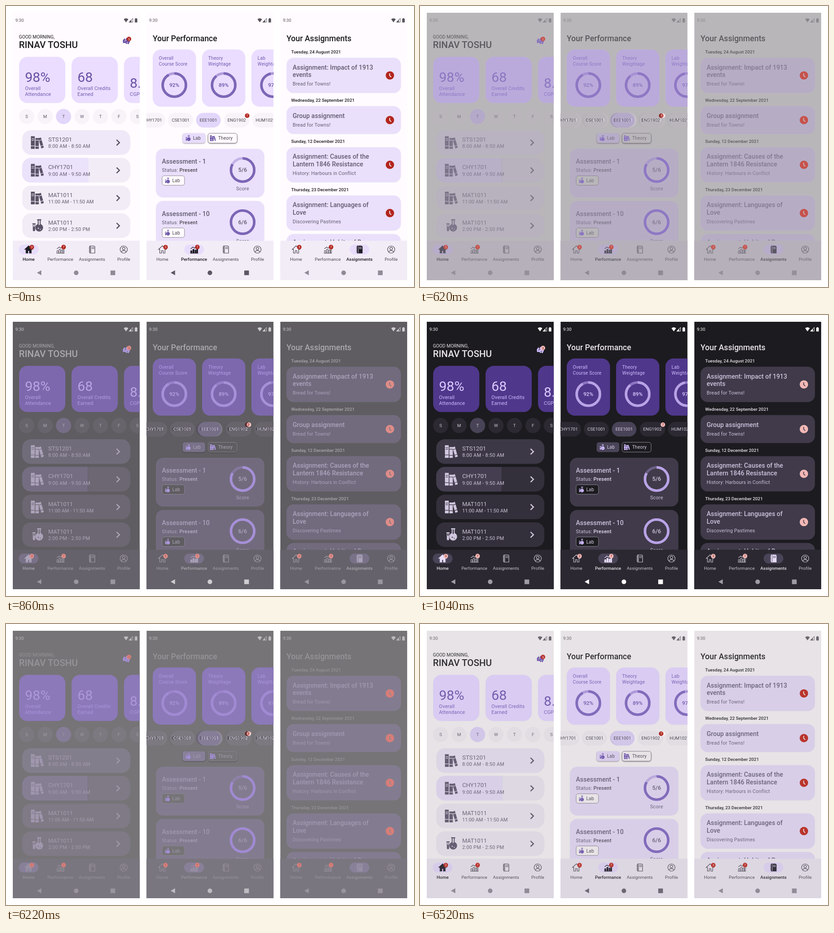
Write an HTML page that moves like this. It is 901 by 622 pixels and loops after 6580 ms.

```html
<!DOCTYPE html>
<html lang="en">
<head>
<meta charset="utf-8">
<title>Light and dark themes</title>
<style>
html, body { margin: 0; width: 100%; height: 100%; overflow: hidden; background: #fff; }
#stage { display: block; width: 901px; height: 622px; }
text { font-family: Roboto, "Open Sans", sans-serif; white-space: pre; }
</style>
</head>
<body>
<svg id="stage" viewBox="0 0 901 622">
  <g id="light"></g>
  <g id="dark"></g>
</svg>
<script>
const LIGHT = {
  dark: false, bg: '#fffbfe', ink: '#1c1b1f', status: '#58545d', nav: '#f2ecf7', navInk: '#49454f',
  pill: '#e8dcfc', card: '#eaddff', cardInk: '#6750a4', cardSub: '#7059ae',
  ring: '#7c66b6', ringRest: '#b39ddb', scoreRest: '#c4b3e6',
  day: '#f7f3f8', dayOn: '#e3d6fb', dayInk: '#625b6c',
  row: '#f1ecf6', rowDone: '#efe8f8', rowPart: '#ebe2fb', rowInk: '#645d70', icon: '#5a5266', chevron: '#544e5e',
  panel: '#eae0fb', panelInk: '#625b71', strong: '#49454f',
  chip: '#fffbfe', chipInk: '#49454f', line: '#8a8490', lab: '#6750a4',
  alert: '#b3261e', alertInk: '#fff', key: '#8f8a95', keyOn: '#5d5765'
};
const DARK = {
  dark: true, bg: '#1c1b1f', ink: '#e9e4ea', status: '#fff', nav: '#2b2831', navInk: '#cac4d0',
  pill: '#4a4458', card: '#4f378b', cardInk: '#dccbff', cardSub: '#d0bcff',
  ring: '#b9a3e6', ringRest: '#8d75c2', scoreRest: '#6b6083',
  day: '#2c2932', dayOn: '#494357', dayInk: '#cac4d0',
  row: '#34303b', rowDone: '#3d3846', rowPart: '#443e50', rowInk: '#ccc4d8', icon: '#d0c6de', chevron: '#d3cbdf',
  panel: '#403a4a', panelInk: '#ccc2dc', strong: '#e8def8',
  chip: '#1c1b1f', chipInk: '#d9d0e4', line: '#8f8a96', lab: '#d0bcff',
  alert: '#f2b8b5', alertInk: '#601410', key: '#a09ca5', keyOn: '#fff'
};
const PITCH = 295.3;

const text = (x, y, size, fill, str, { w = 400, ls = 0, mid = false } = {}) =>
  `<text x="${x}" y="${y}" font-size="${size}" font-weight="${w}" fill="${fill}" letter-spacing="${ls}"` +
  `${mid ? ' text-anchor="middle"' : ''}>${str}</text>`;
const box = (x, y, w, h, r, fill, more = '') =>
  `<rect x="${x}" y="${y}" width="${w}" height="${h}" rx="${r}" fill="${fill}" ${more}/>`;
const dot = (x, y, r, fill) => `<circle cx="${x}" cy="${y}" r="${r}" fill="${fill}"/>`;
const path = (d, fill, stroke = 'none', width = 1) =>
  `<path d="${d}" fill="${fill}" stroke="${stroke}" stroke-width="${width}"/>`;
const at = (x, y, body, scale = 1) => `<g transform="translate(${x} ${y}) scale(${scale})">${body}</g>`;

const badge = (c, x, y, n) =>
  dot(x, y, 5, c.alert) + text(x, y + 2.5, 7, c.alertInk, n, { mid: true });

const ring = (c, x, y, part, rest, label, size) =>
  `<g fill="none" stroke-width="5.6"><circle cx="${x}" cy="${y}" r="25.7" stroke="${rest}"/>` +
  `<circle cx="${x}" cy="${y}" r="25.7" stroke="${c.ring}" pathLength="100" stroke-dasharray="${part} 100"` +
  ` transform="rotate(-90 ${x} ${y})"/></g>` + label(x, y, size);

const books = (fill, gap) =>
  path('M0 0h8.5v28H0zM10 4h7.5v24H10zM16.5 4.5l5.5-1.8L28.5 25 23 27z', fill) +
  path('M1.5 5.5H7M1.5 9H7M0 21.5h8.5M10 9h7.5M10 22.5h7.5M17.5 10l6-2M21.5 22l6-2', 'none', gap, 1.2);
const flask = (fill, gap) =>
  path('M0 9h7v2h-1v13a2.5 2.5 0 0 1-5 0V11H0z', fill) +
  path('M10.5 0h9v2.4h-1.2v8.2a8.6 8.6 0 1 1-6.6 0V2.4h-1.2z', fill) +
  path('M13.8 2.4h2.4v10h-2.4zM2.4 11.5h2.2v5H2.4z', gap) + dot(13, 20, 1.3, gap) + dot(17.5, 22.5, 1, gap);

const clock = (c, y) =>
  dot(847.8, y, 9.3, c.alert) +
  path(`M847.3 ${y - 4.8}v5.3l3.4 3.2`, 'none', c.dark ? '#403a4a' : '#fff', 1.7);

const statusBar = c =>
  text(20.8, 35.3, 9.6, c.status, '9:30') +
  path('M260 29.2q5-3.8 10.2 0L265.1 36.3z', c.status) +
  path('M271.8 35.8h8.2v-8.4z', 'none', c.status, 1) + path('M271 36.2l6-6v6z', c.status) +
  box(284.4, 28, 5.6, 8.4, 1, c.status) + box(286, 27, 2.4, 2, 0, c.status);

const navIcons = [
  (ink, on, gap) =>
    path('M-8.5-.3L0-8.2 8.5-.3H5.8V8H1.8V2.5H-1.8V8H-5.8V-.3z', on ? ink : 'none', ink, 1.2),
  (ink, on) =>
    path('M-7.5 8V2.5h3V8M-2.8 8V-.5h3V8M1.9 8V1h3V8M6 8V-1.5h2.2V8', on ? ink : 'none', ink, 1) +
    path('M-8.5 8.2H9M-7.5-1.5l5-4 3.5 2.5 5-4.2', 'none', ink, 1.1),
  (ink, on, gap) =>
    path('M-4.8-8H4.2l2 1.6V8H-4.8z', on ? ink : 'none', ink, 1.2) +
    path('M-7-5.2h3.4M-7-1.8h3.4M-7 1.7h3.4M-7 5.1h3.4', 'none', ink, 1.3) +
    path('M-2.6-7.5V7.5M0-5h4v3.2H0z', 'none', on ? gap : ink, .9),
  ink =>
    `<circle r="8" fill="none" stroke="${ink}" stroke-width="1.2"/>` +
    `<circle cy="-2.2" r="3" fill="none" stroke="${ink}" stroke-width="1.2"/>` +
    path('M-5.3 5.6C-4 1.2 4 1.2 5.3 5.6', 'none', ink, 1.2)
];
const navNames = ['Home', 'Performance', 'Assignments', 'Profile'];

function navBar(c, active) {
  const key = active === 1 ? c.keyOn : c.key;
  const items = navNames.map((name, i) => {
    const x = 50 + 70 * i, on = i === active;
    const ink = on ? (c.dark ? '#e8def8' : '#1d1b24') : c.navInk;
    return (on ? box(x - 21.8, 528, 43.6, 22, 11, c.pill) : '') +
      at(x, 539, navIcons[i](ink, on, c.pill)) +
      text(x, 563.6, 9.8, on ? c.ink : c.navInk, name, { mid: true, ls: .05, w: on ? 500 : 400 });
  });
  return box(14, 519.5, 283, 88, 0, c.nav) + items.join('') +
    badge(c, 57, 533.8, 3) + badge(c, 127.2, 533.6, 7) +
    path('M68.3 590.5l9.7-5.6v11.2z', key) + dot(155, 590.6, 5.1, key) + box(230.8, 585.4, 10.4, 10.4, .5, key);
}

function screen(c, i, body) {
  const x = 15 + PITCH * i;
  return `<svg x="${x}" y="15" width="280.3" height="592" viewBox="${x} 15 280.3 592">` +
    box(x, 15, 281, 592, 0, c.bg) + body + at(PITCH * i, 0, statusBar(c) + navBar(c, i)) + '</svg>';
}

function home(c) {
  let s = text(28.6, 72, 10.2, c.ink, 'GOOD MORNING,') +
    text(28.6, 93.4, 20.4, c.ink, 'RINAV TOSHU', { w: 500 }) +
    path('M258 76l4-5 1.5 5 2-5.5 6.5 4 1.5 4.5-3 6-2.5-2.5-2 2-2.5-3-5 .5z', c.lab) +
    path('M261 78l5-2M266 81l4-1', 'none', c.bg, 1) + badge(c, 271.5, 73, 3);
  const card = (x, num, y, lines) =>
    box(x, 112.6, 102, 102.2, 18, c.card) + text(x + 13, y, 30, c.cardInk, num) +
    lines.map((t, i) => text(x + 13, 198.6 - 13 * (lines.length - 1 - i), 11, c.cardSub, t, { ls: .15 })).join('');
  s += card(29, '98%', 167.8, ['Overall', 'Attendance']) +
    card(144.8, '68', 167.8, ['Overall Credits', 'Earned']) + card(260.6, '8.7', 181.4, ['CGPA']);

  [...'SMTWTFS'].forEach((d, i) => {
    const x = 45.6 + 40.75 * i;
    s += dot(x, 244.6, 16.8, i === 2 ? c.dayOn : c.day) + text(x, 248, 9.8, c.dayInk, d, { mid: true });
  });

  [['STS1201', '8:00 AM - 8:50 AM'], ['CHY1701', '9:00 AM - 9:50 AM'],
   ['MAT1011', '11:00 AM - 11:50 AM'], ['MAT1011', '2:00 PM - 2:50 PM']].forEach(([code, time], i) => {
    const y = 275 + 61.35 * i, fill = i ? c.row : c.rowDone;
    s += box(35.8, y, 238.8, 54.4, 19, fill);
    if (i === 1) {
      const end = c.dark ? 180 : 182;
      s += path(`M${end} ${y}H54.8a19 19 0 0 0-19 19v16.4a19 19 0 0 0 19 19H${end}z`, c.rowPart);
    }
    const back = i === 1 ? c.rowPart : fill;
    s += i === 3 ? at(58.3, y + 13, flask(c.icon, back)) : at(55, y + 13.2, books(c.icon, back));
    s += text(93.2, y + 25, i > 1 ? 12.6 : 13.1, c.rowInk, code) +
      text(93.2, y + 39.2, 10.8, c.rowInk, time, { ls: i === 2 ? 0 : .28 }) +
      path(`M244.2 ${y + 21.2}l6.3 6.2-6.3 6.2`, 'none', c.chevron, 2.4);
  });
  return s;
}

function performanceTab(c) {
  let s = text(324, 77.8, 17.5, c.ink, 'Your Performance', { w: 500 });
  const percent = (x, y, n) => text(x, y + 4, 11.8, c.cardInk, n + '%', { w: 500, mid: true });
  [['Overall', 'Course Score', 92], ['Theory', 'Weightage', 89], ['Lab', 'Weightage', 97]].forEach(([a, b, n], i) => {
    const x = 324 + 109 * i;
    s += box(x, 96.2, 95.6, 126.6, 18, c.card) +
      text(x + 13.6, 119.4, 10.2, c.cardSub, a, { ls: .2 }) + text(x + 13.6, 131.6, 10.2, c.cardSub, b, { ls: .2 }) +
      ring(c, x + 47.7, 175, n, c.ringRest, percent, n);
  });

  const dx = c.dark ? 3.8 : 0;
  [['CHY1701', 324.2, 55], ['CSE1001', 385.6, 55], ['EEE1001', 447, 54.4],
   ['ENG1902', 509.4, 56], ['HUM1021', 573, 58]].forEach(([code, x, w], i) => {
    s += box(x + dx - w / 2, 236.4, w, 32.6, 16.3, i === 2 ? c.dayOn : c.day) +
      text(x + dx, 256, 9.7, c.chipInk, code, { mid: true });
  });
  s += badge(c, 532.6 + dx, 242.8, 7);

  const soft = c.dark ? '' : 'style="filter:drop-shadow(0 1px 1.2px #0006)"';
  const labIcon = (x, y, gap) => at(x, y, flask(c.lab, gap), .46);
  s += box(390, 281.8, 50, 21.6, 5, c.pill, soft) + labIcon(396.8, 286.2, c.pill) +
    text(413, 296.3, 10.2, c.chipInk, 'Lab', { ls: .1 }) +
    box(446.2, 281.8, 64.2, 21.6, 5, c.chip, `stroke="${c.line}" ${soft}`) +
    at(450.5, 286.2, books(c.lab, c.chip), .46) + text(468.4, 296.3, 10.2, c.chipInk, 'Theory', { ls: .15 });

  const score = (x, y, n) => text(x, y + 4.4, 12.8, c.panelInk, n + '/6', { w: 500, mid: true });
  [['1', 5], ['10', 6]].forEach(([id, n], i) => {
    s += at(0, 115.5 * i,
      box(331, 316, 239.6, 108, 16, c.panel) +
      text(344.3, 349.4, 14, c.panelInk, 'Assessment - ' + id, { w: 500 }) +
      text(344.3, 367, 11.1, c.panelInk,
        `Status: <tspan font-weight="500" fill="${c.strong}">Present</tspan>`, { ls: .2 }) +
      box(344.8, 375.8, 49.4, 21, 4.5, c.chip, `stroke="${c.line}"`) + labIcon(351, 380, c.chip) +
      text(367.2, 390, 10.2, c.chipInk, 'Lab', { ls: .1 }) +
      ring(c, 522.5, 363, n / 6 * 100, c.scoreRest, score, n) +
      text(522.5, 408, 10.9, c.panelInk, 'Score', { mid: true, ls: .2 }));
  });
  return s;
}

function assignments(c) {
  let s = text(619.4, 77.8, 17.5, c.ink, 'Your Assignments', { w: 500 });
  [['Tuesday, 24 August 2021', 105, ['Assignment: Impact of 1913', 'events'], 'Bread for Towns!'],
   ['Wednesday, 22 September 2021', 212, ['Group assignment'], 'Bread for Towns!'],
   ['Sunday, 12 December 2021', 302.8, ['Assignment: Causes of the', 'Lantern 1846 Resistance'], 'History: Harbours in Conflict'],
   ['Thursday, 23 December 2021', 409.6, ['Assignment: Languages of', 'Love'], 'Discovering Pastimes']
  ].forEach(([date, y, lines, sub]) => {
    const extra = 16.4 * (lines.length - 1), top = y + 9.6;
    s += text(629.8, y, 9.75, c.ink, date, { w: 500 }) + box(619.4, top, 252.8, 61.8 + extra, 16, c.panel) +
      lines.map((t, i) => text(633, top + 26 + 16.4 * i, 14, c.panelInk, t, { w: 500 })).join('') +
      text(633, top + 45.4 + extra, 10.8, c.panelInk, sub, { ls: .15 }) + clock(c, top + 30.9 + extra / 2);
  });
  return s + box(619.4, 504.4, 252.8, 78, 16, c.panel) +
    text(633, 528.4, 14, c.panelInk, 'Assignment: Habits of Bees', { w: 500 });
}

const draw = c => [home, performanceTab, assignments].map((f, i) => screen(c, i, f(c))).join('');
const darkLayer = document.getElementById('dark');
document.getElementById('light').innerHTML = draw(LIGHT);
darkLayer.innerHTML = draw(DARK);

// The themes cross-fade in tenths, one step every 60 ms.
const LOOP = 6580, STEP = 60;
function mix(t) {
  if (t < 500) return 0;
  if (t < 1040) return (Math.floor((t - 500) / STEP) + 1) / 10;
  if (t < 6040) return 1;
  return (9 - Math.floor((t - 6040) / STEP)) / 10;
}
function tick() {
  darkLayer.style.opacity = mix(performance.now() % LOOP);
  requestAnimationFrame(tick);
}
tick();
</script>
</body>
</html>
```
